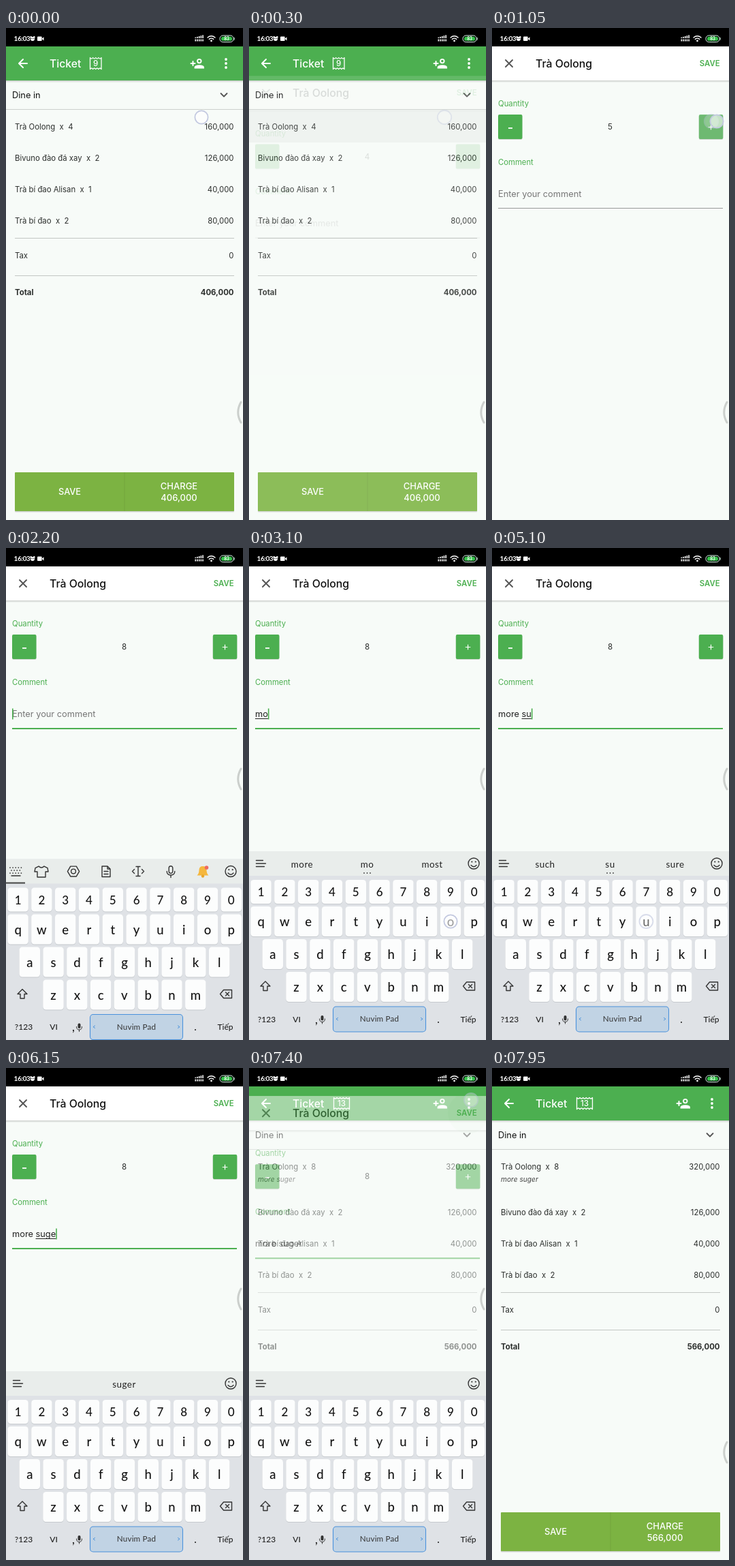
Write an HTML page that moves like this. It is 348 px wide and 722 px high and loops after 8 s.

```html
<!DOCTYPE html>
<html lang="en">
<head>
<meta charset="utf-8">
<title>Ticket</title>
<style>
html, body { margin: 0; width: 100%; height: 100%; overflow: hidden; background: #f7fbf8; }
svg { display: block; width: 100vw; height: 100vh; }
text { font-family: Inter, Roboto, sans-serif; white-space: pre; }
.kb text, .status text { font-family: Lato, "Open Sans", sans-serif; }
.ln { fill: none; stroke: #333; stroke-width: 1.4; stroke-linecap: round; stroke-linejoin: round; }
</style>
</head>
<body>
<svg id="stage" viewBox="0 0 348 722" preserveAspectRatio="none"></svg>
<script>
const LOOP = 8000;
const GREEN = '#4caf50', BG = '#f7fbf8', INK = '#2b2e2c';

// Markup helpers; text is placed by the middle of its capitals.
const text = (x, cy, size, str, extra = '') =>
  `<text x="${x}" y="${(cy + size * 0.363).toFixed(2)}" font-size="${size}" ${extra}>${str}</text>`;
const rect = (x, y, w, h, fill, extra = '') =>
  `<rect x="${x}" y="${y}" width="${w}" height="${h}" fill="${fill}" ${extra}/>`;
const line = (d, extra = '') => `<path class="ln" d="${d}" ${extra}/>`;
const dot = (x, y, r, fill) => `<circle cx="${x}" cy="${y}" r="${r}" fill="${fill}"/>`;
const MID = 'text-anchor="middle"', END = 'text-anchor="end"';
const WHITE = 'fill="#fff"';

const shade = y => [0.16, 0.09, 0.04]
  .map((a, i) => rect(0, y + i, 348, 1, '#000', `opacity="${a}"`)).join('');

function statusBar() {
  let s = rect(0, 0, 348, 27, '#000');
  s += text(11.5, 15.5, 10.2, '16:03', WHITE + ' font-weight="700" letter-spacing="-.5"');
  s += dot(39, 16, 3, '#fff') + dot(36.7, 13.2, 1.3, '#fff') + dot(41.3, 13.2, 1.3, '#fff');
  s += dot(37.8, 15.6, 0.7, '#000') + dot(40.2, 15.6, 0.7, '#000');
  s += rect(46, 12.5, 6.6, 6.6, '#fff', 'rx="1"') + '<path d="M52.5 15.8l3-2.6v5.2z" fill="#fff"/>';
  for (let i = 0; i < 5; i++) {
    const h = 1.4 + i * 0.8;
    s += rect(277.5 + i * 2.7, 15 - h, 1.6, h, '#fff') + rect(277.5 + i * 2.7, 16.5, 1.6, 3, '#fff');
  }
  const arc = 'style="stroke:#fff"';
  s += line('M296 14q5.5-4.6 11 0', arc) + line('M298.3 16.4q3.2-2.6 6.4 0', arc) + dot(301.5, 18.8, 1.4, '#fff');
  s += rect(314, 11, 20, 9.6, 'none', 'rx="4.5" stroke="#dfe" stroke-width="1"') + rect(334.6, 14, 1, 3.6, '#dfe');
  s += rect(316, 12.8, 16, 6, '#35c24a', 'rx="2.6"');
  return s + text(324, 15.9, 6.5, '83', MID + ' fill="#fff" font-weight="700"');
}

function receipt(label, x, w) {
  const n = Math.round(w / 4.2), step = w / n;
  const zig = dir => Array.from({ length: n }, () =>
    `q${dir * step / 2} ${dir * 3} ${dir * step} 0`).join('');
  return line(`M${x} 43.5${zig(1)}v17${zig(-1)}z`, 'style="stroke:#fff;stroke-width:1.3"') +
    text(x + w / 2, 52.2, 11.6, label, MID + ' fill="#fff" font-weight="500"');
}

function ticket(order) {
  const w = 'style="stroke:#fff;stroke-width:2"';
  let s = rect(0, 27, 348, 695, BG) + shade(77) + rect(0, 27, 348, 50, GREEN);
  s += line('M31 52H19.5M25 46l-6 6 6 6', w);
  s += text(64, 52, 15.7, 'Ticket', WHITE + ' font-weight="500"');
  s += receipt(order.count, order.iconX, order.iconW);
  s += line('M271.5 52h6M274.5 49v6', w) + dot(283.8, 48.6, 3.7, '#fff');
  s += '<path d="M276.6 59.6v-1.8q0-3.6 7.2-3.6t7.2 3.6v1.8z" fill="#fff"/>' + dot(283.8, 48.6, 1.8, GREEN);
  s += [46, 52, 58].map(y => dot(323, y, 1.9, '#fff')).join('');
  s += text(9, 98, 12.8, 'Dine in', 'fill="#111"');
  s += line('M315.5 96l4.5 4.5 4.5-4.5', 'style="stroke:#555;stroke-width:1.8"');
  s += rect(0, 119, 348, 1, '#ccd0cd');
  const row = (y, name, price, extra = '') =>
    text(13, y, 11.35, name, `fill="${INK}" ${extra}`) +
    text(334.5, y, 11.35, price, `${END} fill="${INK}" ${extra}`);
  const d = order.note ? 21 : 0;
  s += row(144.6, `Trà Oolong  x  ${order.qty}`, order.price);
  if (order.note) s += text(13, 163, 10.2, order.note, 'fill="#444" font-style="italic"');
  s += row(190.6 + d, 'Bivuno đào đá xay  x  2', '126,000');
  s += row(236.8 + d, 'Trà bí đao Alisan  x  1', '40,000');
  s += row(282.8 + d, 'Trà bí đao  x  2', '80,000');
  s += rect(13, 308 + d, 322, 1, '#c3c7c4') + row(333.4 + d, 'Tax', '0');
  s += rect(13, 363 + d, 322, 1, '#c3c7c4') + row(387.6 + d, 'Total', order.total, 'font-weight="700"');
  const btn = MID + ' fill="#fff" font-weight="500"';
  s += rect(13, 653.5, 322, 57, '#000', 'opacity=".16" rx="1"') + rect(13, 652, 322, 57, '#7cb342', 'rx="1"');
  s += rect(173.5, 652, 1, 57, '#72a63d');
  s += text(93.5, 680.5, 12.8, 'SAVE', btn) + text(254, 672, 13, 'CHARGE', btn);
  return s + text(254, 688.8, 13, order.total, btn);
}

function itemPage() {
  const green = `fill="${GREEN}"`;
  let s = rect(0, 27, 348, 695, BG) + shade(77) + rect(0, 27, 348, 50, '#fff');
  s += line('M20 47l10 10M30 47l-10 10', 'style="stroke:#555;stroke-width:1.9"');
  s += text(64, 52, 15.8, 'Trà Oolong', 'fill="#111" font-weight="500"');
  s += text(334.5, 51.6, 11.3, 'SAVE', `${END} ${green} font-weight="600"`);
  s += '<circle id="saveRipple" cx="322" cy="52" r="30" fill="#4caf50" opacity="0"/>';
  s += text(9, 111, 11.3, 'Quantity', green) + text(9, 196.7, 11.3, 'Comment', green);
  const button = (x, id) => rect(x, 128.5, 35.5, 35.5, '#000', 'opacity=".15" rx="2"') +
    rect(x, 127, 35.5, 36, GREEN, `rx="2" id="${id}"`);
  s += button(9, 'minus') + button(303.8, 'plus');
  s += rect(24, 146, 6, 1.8, '#fff') + line('M318.2 145.5h6.6M321.5 142.2v6.6', 'style="stroke:#fff;stroke-width:1.2"');
  s += text(173.5, 145, 11.6, '4', `${MID} fill="${INK}" id="qty"`);
  s += text(9, 243, 12.8, 'Enter your comment', 'fill="#777" id="hint"');
  s += text(9, 243, 12.8, '', 'fill="#222" id="note"');
  s += rect(9, 250, 0, 1, '#222', 'id="compose"') + rect(9, 235.5, 1.6, 16, GREEN, 'id="caret"');
  return s + rect(9, 264, 330, 1, '#999', 'id="field"');
}

// Key centres by letter, shared by drawing and touches.
const PITCH = 34.8;
const ROWS = [['1234567890', 17.6, 487, 35], ['qwertyuiop', 17.6, 526, 44],
  ['asdfghjkl', 34.8, 574, 44], ['zxcvbnm', 69.5, 622, 44]];
const keyAt = { ' ': [177, 677] };
for (const [keys, x0, y, h] of ROWS)
  [...keys].forEach((k, i) => keyAt[k] = [x0 + i * PITCH, y + h / 2]);

function toolbarIcons() {
  let s = '';
  for (let r = 0; r < 3; r++)
    for (let i = 0; i < 5 - r % 2; i++) s += dot(6 + r % 2 * 2 + i * 4.1, 457.5 + r * 4, 0.9, '#333');
  s += line('M8 469.5h13') + rect(0, 479, 28, 2, '#444');
  s += line('M48 455.5l-5 2.5-1 5.5h4v8h12v-8h4l-1-5.5-5-2.5q-4 4-8 0z');
  const gear = Array.from({ length: 6 }, (_, i) => {
    const a = i * Math.PI / 3;
    return `${(99 + 8.6 * Math.cos(a)).toFixed(1)} ${(463 + 8.6 * Math.sin(a)).toFixed(1)}`;
  }).join('L');
  s += line(`M${gear}z`) + line('M102.4 463a3.4 3.4 0 1 1-6.8 0a3.4 3.4 0 1 1 6.8 0');
  s += line('M141 455.5h8l4 4v11.5h-12zM149 455.5v4h4M144 463h6M144 467h6');
  s += line('M191 456h6M194 456v14M191 470h6M188.5 460l-3 3 3 3M199.5 460l3 3-3 3');
  s += line('M239.2 458a2.8 2.8 0 0 1 5.6 0v5a2.8 2.8 0 0 1-5.6 0zM236.2 463q0 5.4 5.8 5.4t5.8-5.4M242 468.5v3.5');
  s += '<path d="M280.5 469q3-2.5 3-8 0-5.6 5.5-5.6t5.5 5.6q0 5.500 3 8z" fill="#f5b73d"/>' + dot(289, 470, 2.2, '#e9a52c');
  return s + dot(294.5, 457.5, 2.8, '#ee6a5f');
}

function keyboard() {
  let s = rect(0, 445, 348, 280, '#dfe2e6') + rect(0, 445, 348, 36, '#e9edeb');
  s += `<g id="tools">${toolbarIcons()}</g><g id="words">`;
  s += line('M10.5 458.500h10M10.5 463h14M10.5 467.500h12');
  [78, 173.5, 269].forEach((x, i) =>
    s += text(x, 464, 13.4, '', `${MID} fill="#222" letter-spacing=".5" id="word${i}"`));
  s += `<g id="more">${[169, 173.5, 178].map(x => dot(x, 477, 0.9, '#444')).join('')}</g></g>`;
  s += line('M338 463a8 8 0 1 1-16 0a8 8 0 1 1 16 0M326 465.500q4 4.500 8 0') +
    dot(327.3, 460.5, 1.1, '#333') + dot(332.7, 460.5, 1.1, '#333');
  for (const [keys, , y, h] of ROWS) for (const k of keys) {
    const [x, cy] = keyAt[k];
    s += rect(x - 15.2, y + 1, 30.4, h, '#c6cace', 'rx="4.5"') + rect(x - 15.2, y, 30.4, h, '#fcfdfd', 'rx="4.5"');
    s += text(x, cy + 0.5, h > 40 ? 18.5 : 17, k, MID + ' fill="#151515" font-weight="500"');
  }
  s += line('M24 636l-7 7h4v6.500h6v-6.500h4z');
  s += line('M314.500 643l5-6h12v12h-12zM322.500 640.500l5 5M327.500 640.500l-5 5');
  const label = (x, str, size = 12) => text(x, 691.5, size, str, MID + ' fill="#222" font-weight="500"');
  s += label(26, '?123') + label(70, 'VI') + label(99, ',', 17) + label(278, '.', 15) + label(322, 'Tiếp');
  s += rect(105.5, 686, 4, 7.5, '#333', 'rx="2"') + line('M103.500 691q0 4.500 4 4.500t4-4.500M107.500 695.500v2.500', 'style="stroke-width:1"');
  s += rect(123.5, 673, 136, 37, '#c1d3e4', 'rx="4.5" stroke="#4a92dc" stroke-width="1.1"');
  s += text(191.5, 691, 11.6, 'Nuvim Pad', MID + ' fill="#333" letter-spacing=".2"');
  const tip = 'style="stroke:#4a92dc;stroke-width:1"';
  return s + line('M130.500 689.500l-2.500 1.700 2.500 1.700', tip) + line('M252.500 689.500l2.500 1.700-2.500 1.700', tip);
}

// Typed characters with their times, and the words offered for each prefix.
const TYPED = [[2750, 'm'], [3020, 'o'], [3290, 'r'], [3560, 'e'], [3980, ' '],
  [4500, 's'], [4930, 'u'], [5350, 'g'], [5800, 'e'], [6400, 'r']];
const WORDS = {
  m: ['me', 'm', 'my'], mo: ['more', 'mo', 'most'], mor: ['more', 'mor', 'morning'],
  more: ['moreover', 'More', 'Moreno'], s: ['so', 's', 'she'], su: ['such', 'su', 'sure'],
  sug: ['sugar', 'sug', 'suggest'], suge: ['', 'suger', ''], suger: ['', 'suger', '']
};
const PLUS = [[800, 900, 322, 137], [1020, 1110, 330, 137], [1230, 1320, 327, 138], [1440, 1530, 329, 137]];
const FOCUS = 1720, SAVED = 7280;
const TOUCHES = [[-100, 150, 287, 131], ...PLUS, [1640, FOCUS, 120, 242], [6750, SAVED, 326, 47],
  ...TYPED.map(([t, k]) => [t - 60, t + 80, ...keyAt[k]])];

const before = { qty: 4, count: '9', iconX: 123.5, iconW: 16.5, price: '160,000', total: '406,000' };
const after = { qty: 8, count: '13', iconX: 124.5, iconW: 23, price: '320,000', total: '566,000', note: 'more suger' };

const stage = document.getElementById('stage');
stage.innerHTML = `<g id="first">${ticket(before)}</g><g id="second">${ticket(after)}</g>` +
  rect(0, 120, 348, 48, '#000', 'id="rowRipple"') +
  `<g id="item">${itemPage()}</g><g id="keys" class="kb">${keyboard()}</g>` +
  line('M345 549q-8.500 15 0 30', 'id="handle" style="stroke:#cbcfcc;stroke-width:3"') +
  TOUCHES.map((_, i) => `<circle id="touch${i}" fill="#fff" fill-opacity=".6" stroke="#c3c9e0" stroke-width="1.8"/>`).join('') +
  `<g class="status">${statusBar()}</g>`;

const ui = {};
stage.querySelectorAll('[id]').forEach(el => ui[el.id] = el);
const set = (id, attrs) => { for (const k in attrs) ui[id].setAttribute(k, attrs[k]); };
const show = (id, on) => ui[id].setAttribute('visibility', on ? 'inherit' : 'hidden');
const put = (id, str) => { if (ui[id].textContent !== str) ui[id].textContent = str; };
const ramp = (t, from, span) => Math.min(1, Math.max(0, (t - from) / span));
const bump = (t, down, up, fade) => ramp(t, down, 40) * (1 - ramp(t, up, fade));

function drawItem(t) {
  const enter = ramp(t, 280, 260), leave = ramp(t, SAVED, 240);
  const y = 56 * ((1 - enter) ** 3 + leave ** 2);
  set('item', { transform: `translate(0 ${y})`, opacity: Math.min(1, enter * 1.6) * (1 - leave) });
  put('qty', String(4 + PLUS.filter(p => t >= p[1]).length));
  const lit = Math.max(...PLUS.map(p => bump(t, p[0] - 20, p[1], 120)));
  set('plus', { 'fill-opacity': 1 - 0.25 * lit });
  set('saveRipple', { opacity: 0.1 * bump(t, 6780, SAVED, 250) });

  const done = TYPED.filter(k => t >= k[0]);
  const str = done.map(k => k[1]).join('');
  const word = str.split(' ').pop();
  const focused = t >= FOCUS + 40 && t < SAVED;
  put('note', str);
  show('hint', !str);
  const width = n => n ? ui.note.getSubStringLength(0, n) : 0;
  const end = width(str.length), start = width(str.length - word.length);
  const last = done.length ? done[done.length - 1][0] : FOCUS;
  set('caret', { x: 9 + end });
  show('caret', focused && (t - last) % 1000 < 500);
  set('compose', { x: 9 + start, width: end - start });
  show('compose', word && focused);
  const green = t >= FOCUS + 40;
  set('field', { fill: green ? GREEN : '#999', height: green ? 2 : 1 });

  show('tools', !str);
  show('words', str);
  const offers = t < SAVED && WORDS[word || str.trim()] || ['', '', ''];
  offers.forEach((w, i) => put('word' + i, w));
  show('more', str && offers[0]);
}

function draw(t) {
  show('first', t < 2000);
  show('second', t >= 2000);
  set('rowRipple', { opacity: 0.05 * bump(t, 100, 240, 200) });
  drawItem(t);
  const drop = 277 * ((1 - ramp(t, 2005, 300)) ** 3 + ramp(t, 7430, 230) ** 2);
  set('keys', { transform: `translate(0 ${drop})` });
  show('keys', drop < 277);
  set('handle', { transform: `translate(0 ${t >= 2050 && t < 7640 ? -225 : 0})` });
  TOUCHES.forEach(([down, up, x, y], i) => {
    const gone = ramp(t, up, 240);
    set('touch' + i, { cx: x, cy: y, r: 9.6 + gone, opacity: t < down ? 0 : 1 - gone });
  });
}

function frame() {
  draw(performance.now() % LOOP);
  requestAnimationFrame(frame);
}
frame();
</script>
</body>
</html>
```
